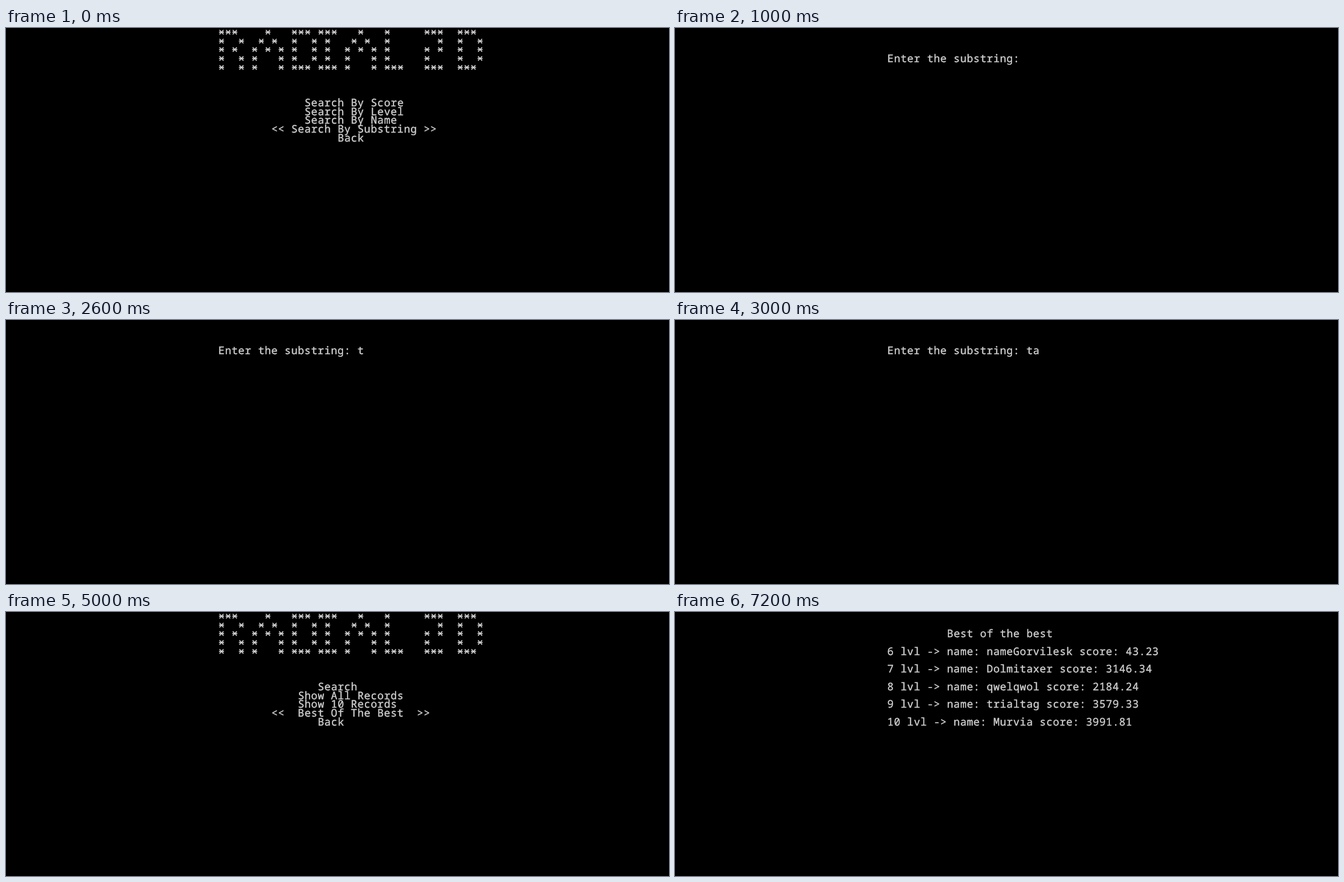
Animation, 1186 px wide and 472 px high, one loop 8000 ms. Source, as an HTML page:

```html
<!DOCTYPE html>
<html lang="en">
<head>
<meta charset="utf-8">
<title>Console records</title>
<style>
  html, body { margin: 0; width: 100%; height: 100%; overflow: hidden; background: #000; }
  svg { display: block; width: 1186px; height: 472px; background: #000; }
  text {
    font: 18.8px "Noto Sans Mono", monospace;
    letter-spacing: 0.58px;
    font-variant-ligatures: none;
    white-space: pre;
    fill: #ccc;
    stroke: #ccc;
    stroke-width: 0.45px;
    text-rendering: geometricPrecision;
  }
  path { fill: none; stroke: #ccc; stroke-width: 1.8px; }
</style>
</head>
<body>
<svg id="screen" viewBox="0 0 1186 472"></svg>
<script>
const COL = 11.86, ROW = 15.75, LEFT = 32, BASE = 13.75;
const LOOP = 8000;
const screen = document.getElementById("screen");

const baseline = row => Math.round(row * ROW + BASE);

function make(tag, attrs, text = "") {
  const node = document.createElementNS("http://www.w3.org/2000/svg", tag);
  for (const name in attrs) node.setAttribute(name, attrs[name]);
  node.textContent = text;
  return node;
}

const line = (row, col, text) =>
  make("text", { x: col * COL + 0.3, y: baseline(row) }, text);

// A console asterisk: a cross with a bar through the middle.
function star(row, col) {
  const x = col * COL + 6, y = baseline(row) - 6.5;
  return `M${x - 3.6} ${y - 4}l7.2 8m0 -8l-7.2 8M${x - 4.5} ${y}h9`;
}

const banner = make("path", {
  d: [
    "***    *   *** ***   *   *     ***  ***",
    "*  *  * *  *  * *   * *  *       *  *  *",
    "* *  * * * *  * *  * * * *     * *  *  *",
    "*  * *   * *  * *  *   * *     *    *  *",
    "*  * *   * *** *** *   * ***   ***  ***"
  ].map((text, row) =>
    [...text].map((c, i) => c === "*" ? star(row, LEFT + i) : "").join("")
  ).join("")
});

const searchMenu = [
  banner,
  line(8, 45, "Search By Score"),
  line(9, 45, "Search By Level"),
  line(10, 45, "Search By Name"),
  line(11, 40, "<< Search By Substring >>"),
  line(12, 50, "Back")
];

const recordsMenu = [
  banner,
  line(8, 47, "Search"),
  line(9, 44, "Show All Records"),
  line(10, 44, "Show 10 Records"),
  line(11, 40, "<<  Best Of The Best  >>"),
  line(12, 47, "Back")
];

const query = "ta";
const prompts = [0, 1, 2].map(count =>
  [line(3, LEFT, "Enter the substring: " + query.slice(0, count))]);

const results = [
  ...prompts[query.length],
  ...[
    ["Vesota", 5, "3567.86"],
    ["Rostavi", 3, "2544.69"],
    ["Dolmitaxer", 4, "3146.34"]
  ].map(([name, level, score], i) =>
    line(5 + i, LEFT, `name: ${name} level: ${level} score: ${score}`))
];

const best = [
  line(2, 41, "Best of the best"),
  ...[
    ["nameGorvilesk", "43.23"],
    ["Dolmitaxer", "3146.34"],
    ["qwelqwol", "2184.24"],
    ["trialtag", "3579.33"],
    ["Murvia", "3991.81"]
  ].map(([name, score], i) =>
    line(4 + 2 * i, LEFT, `${6 + i} lvl -> name: ${name} score: ${score}`))
];

function sceneAt(ms) {
  if (ms < 1000) return searchMenu;
  if (ms < 4000) return prompts[Math.floor(ms / 1000) - 1];
  if (ms < 5000) return results;
  if (ms < 6000) return recordsMenu;
  return best;
}

let shown = null;
function draw(ms) {
  const scene = sceneAt(ms);
  if (scene === shown) return;
  shown = scene;
  screen.replaceChildren(...scene);
}

const start = performance.now();
function tick() {
  draw((performance.now() - start) % LOOP);
  requestAnimationFrame(tick);
}
tick();
</script>
</body>
</html>
```
